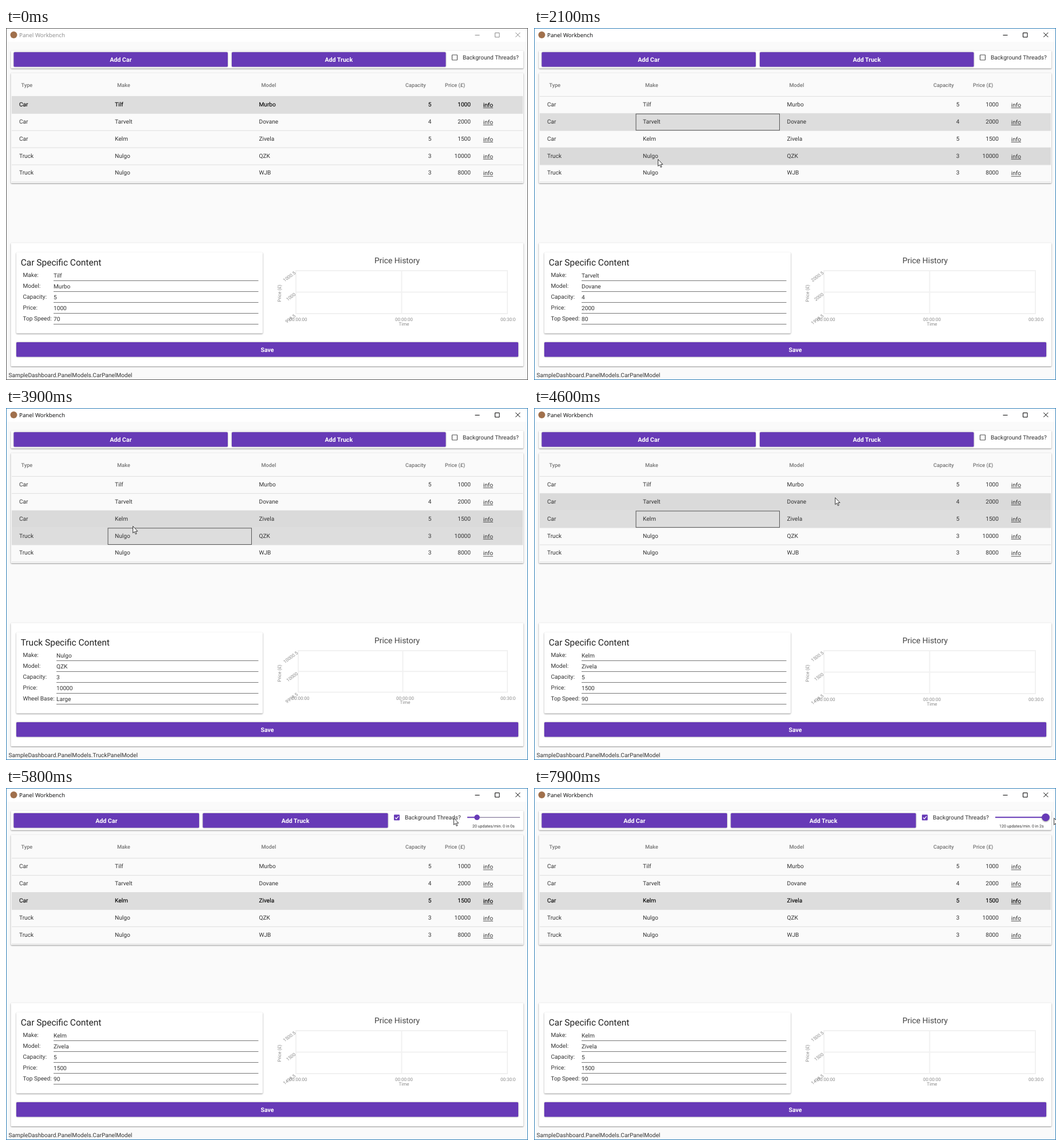
An HTML page that plays this animation: 911x615 px, repeating every 8 s.

```html
<!DOCTYPE html>
<html lang="en">
<head>
<meta charset="utf-8">
<title>Panel Workbench</title>
<style>
html, body { margin: 0; width: 100%; height: 100%; overflow: hidden; background: #fafafa; }
svg { display: block; width: 911px; height: 615px; font: 10.15px Roboto, sans-serif; text-rendering: geometricPrecision; }
text { fill: #333; white-space: pre; }
.card { filter: drop-shadow(0 1px 1.2px rgba(0, 0, 0, .42)); }
.button { fill: #673ab7; filter: drop-shadow(0 .8px 1px rgba(0, 0, 0, .4)); }
.caption { fill: #fff; font-weight: 700; font-size: 10.6px; }
.head { fill: #757575; font-weight: 500; font-size: 9.2px; }
.form-title { font-size: 15.5px; fill: #222; }
.chart { filter: blur(.4px); }
.chart text { font-size: 8px; fill: #8a8a8a; }
.chart path { fill: none; stroke: #f1f1f1; stroke-width: 2; }
</style>
</head>
<body>
<svg id="stage" viewBox="0 0 911 615"></svg>
<script>
const LOOP = 8000, STEP = 100;
const PURPLE = '#673ab7';
const CHECKED_AT = 5700, DRAG_AT = 6600;
const NUMBER_END = [742.5, 811];

const vehicles = [
  { type: 'Car', make: 'Tilf', model: 'Murbo', capacity: 5, price: 1000, extra: 70 },
  { type: 'Car', make: 'Tarvelt', model: 'Dovane', capacity: 4, price: 2000, extra: 80 },
  { type: 'Car', make: 'Kelm', model: 'Zivela', capacity: 5, price: 1500, extra: 90 },
  { type: 'Truck', make: 'Nulgo', model: 'QZK', capacity: 3, price: 10000, extra: 'Large' },
  { type: 'Truck', make: 'Nulgo', model: 'WJB', capacity: 3, price: 8000, extra: 'Small' }
];

// time of each selection and the chosen row
const picks = [[-1000, 0], [1500, 1], [2500, 3], [4000, 2]];

// time, x, y of the pointer tip
const pointer = [
  [100, 471, 8], [900, 222, 127], [1000, 220, 150], [1100, 219, 160],
  [1600, 219, 160], [2100, 216, 229], [3400, 216, 229], [3900, 221, 206],
  [4300, 221, 206], [4800, 728, 123], [5100, 768, 67], [5500, 781, 52],
  [5800, 781, 52], [6500, 822, 53], [7400, 876, 56], [7900, 907, 52]
];

const clamp = (v, lo, hi) => Math.min(hi, Math.max(lo, v));
const mix = (a, b, p) => a + (b - a) * p;
const text = (x, y, s, attrs = '') => `<text x="${x}" y="${y}" ${attrs}>${s}</text>`;
const rect = (x, y, w, h, attrs = '') => `<rect x="${x}" y="${y}" width="${w}" height="${h}" ${attrs}/>`;
const line = (x1, x2, y, color, w = 1) =>
  `<path d="M${x1} ${y}H${x2}" stroke="${color}" stroke-width="${w}"/>`;
const card = (x, y, w, h, fill = '#fff') => rect(x, y, w, h, `rx="1.5" class="card" fill="${fill}"`);
const middle = 'text-anchor="middle"';

function pointerAt(t) {
  if (t < pointer[0][0]) return { x: -50, y: -50 };
  const i = pointer.findIndex(k => k[0] > t);
  if (i < 0) { const [, x, y] = pointer.at(-1); return { x, y }; }
  const [a, b] = [pointer[i - 1], pointer[i]];
  const p = (t - a[0]) / (b[0] - a[0]);
  return { x: mix(a[1], b[1], p), y: mix(a[2], b[2], p) };
}

function button(x, y, w, label, tip) {
  const over = tip.x >= x && tip.x < x + w && tip.y >= y && tip.y < y + 25.5;
  return rect(x, y, w, 25.5, `rx="1.5" class="button" opacity="${over ? .9 : 1}"`) +
    text(x + w / 2, y + 16.7, label, `${middle} class="caption"`);
}

function titleBar(active) {
  const ink = active ? '#000' : '#888';
  return rect(0, 0, 911, 24, 'fill="#fff"') +
    '<circle cx="13.5" cy="12" r="6" fill="#a0704c"/>' +
    text(23, 16, 'Panel Workbench', `style="font:9.8px 'Open Sans',sans-serif;fill:${ink}"`) +
    `<path d="M818.5 12.5h8M853.5 8.5h7.5v7.5h-7.5zM889.3 8l8 8m0-8l-8 8" fill="none" stroke="${ink}"/>`;
}

function slider(t, tip) {
  const dragging = t >= DRAG_AT;
  const x = dragging ? clamp(tip.x, 822, 893) : 822;
  const rate = Math.round(20 + (x - 822) / .71);
  const seconds = Math.floor((t - CHECKED_AT) / 1000);
  return line(805, 897, 51.3, '#6b5a85') + line(805, x, 51.3, PURPLE, 2) +
    `<circle cx="${x}" cy="51.3" r="${dragging ? 6.8 : 4.8}" fill="${PURPLE}" ${dragging ? 'class="card"' : ''}/>` +
    text(850.8, 69, `${rate} updates/min. 0 in ${seconds}s`, `${middle} font-size="7"`);
}

function toolbar(t, tip, checked) {
  const box = checked
    ? rect(677, 46.5, 10, 10, `rx="1" fill="${PURPLE}"`) +
      '<path d="M679 51.6l2.2 2.2 4-4.4" fill="none" stroke="#fff" stroke-width="1.3"/>'
    : rect(778.5, 47, 9, 9, 'rx=".8" fill="#fff" stroke="#555" stroke-width="1.2"');
  const label = text(checked ? 696 : 797, 55.2, 'Background Threads?');
  const buttons = checked
    ? button(13.5, 44, 323.5, 'Add Car', tip) + button(343.5, 44, 323, 'Add Truck', tip)
    : button(13.5, 42.3, 373.5, 'Add Car', tip) + button(394, 42.3, 373.5, 'Add Truck', tip);
  return card(8.5, 39.5, 894.5, checked ? 34 : 31) + buttons + box + label + (checked ? slider(t, tip) : '');
}

function row(v, i, top, selected, focused, hover) {
  const y = top + i * 29.9, base = y + 17.4;
  const fill = selected ? '#ddd' : hover ? '#dadada' : 'none';
  const ink = selected && !focused ? 'style="fill:#000;stroke:#000;stroke-width:.12"' : '';
  return rect(10, y, 892, 29.9, `fill="${fill}"`) + line(10, 902, y + 29.9, '#dedede') +
    (selected && focused ? rect(178, y + .8, 250.5, 28.6, 'fill="none" stroke="#555"') : '') +
    text(23, base, v.type, ink) + text(190, base, v.make, ink) + text(441.5, base, v.model, ink) +
    [v.capacity, v.price].map((n, k) => text(NUMBER_END[k], base, n, `text-anchor="end" ${ink}`)).join('') +
    text(832.7, base + 1, 'info', ink) + line(832.7, 850, base + 2.8, '#333', .8);
}

function table(t, tip, checked, selected) {
  const shift = checked ? 3.3 : 0, top = 119.4 + shift;
  const focused = t >= 1500 && !checked;
  const hovered = tip.x > 10 && tip.x < 902 ? Math.floor((tip.y - top) / 29.9) : -1;
  const heads = [[26.5, 'Type'], [194, 'Make'], [445.5, 'Model'], [697, 'Capacity'], [766, 'Price (£)']];
  return card(8.5, 78.5 + shift, 894.5, 192.5, '#fafafa') +
    heads.map(([x, s]) => text(x, 102.7 + shift, s, 'class="head"')).join('') +
    line(10, 902, top, '#dedede') +
    vehicles.map((v, i) => row(v, i, top, i === selected, focused, i === hovered)).join('');
}

function form(v) {
  const truck = v.type === 'Truck', x = truck ? 88 : 83;
  const fields = [['Make:', v.make], ['Model:', v.model], ['Capacity:', v.capacity],
    ['Price:', v.price], [truck ? 'Wheel Base:' : 'Top Speed:', v.extra]];
  return card(18, 392, 430, 141.5) +
    text(25.7, 414.6, v.type + ' Specific Content', 'class="form-title"') +
    fields.map(([label, value], i) => {
      const y = 434.5 + i * 19;
      return text(29.5, y, label) + text(x, y + 1.5, value) + line(x, 440.5, y + 7, '#777');
    }).join('');
}

function priceLabels(v, left, bottom, alpha) {
  const levels = [v.price + .5, v.price, v.price - .5];
  return `<g opacity="${alpha}">` + levels.map((n, i) => {
    const y = mix(424, bottom, i / 2) + 5;
    return text(left, y, n, `text-anchor="end" transform="rotate(-37 ${left} ${y})"`);
  }).join('') + '</g>';
}

function chart(from, to, p) {
  const wide = v => v.type === 'Truck' ? 1 : 0;
  const k = mix(wide(from), wide(to), p);
  const left = 506 + 4 * k, bottom = 499 - 2.5 * k;
  const mx = (left + 875) / 2, my = (424 + bottom) / 2, base = bottom + 13;
  return text(682.5, 411, 'Price History', `${middle} style="font-size:13.9px;fill:#444;filter:blur(.25px)"`) +
    '<g class="chart">' +
    `<path d="M${left} 424H875V${bottom}H${left}zM${mx} 424V${bottom}M${left} ${my}H875"/>` +
    text(0, 0, 'Price (£)', `${middle} transform="translate(480 463.5) rotate(-90)"`) +
    text(left + 4, base, '00:00:00', middle) + text(mx + 4, base, '00:00:00', middle) +
    text(863, base, '00:30:0') + text(mx + 4, base + 7.5, 'Time', middle) +
    (p < 1 ? priceLabels(from, left, bottom, 1 - p) : '') + priceLabels(to, left, bottom, p) +
    '</g>';
}

function cursor({ x, y }) {
  return `<path transform="translate(${x} ${y})" d="M.5 .5V12.4L3.2 9.9L5.2 14.4L7 13.6L5.1 9.3H8.8Z"
    fill="#fff" stroke="#222" stroke-width=".9"/>`;
}

const stage = document.getElementById('stage');

function draw(t) {
  const tip = pointerAt(t), checked = t >= CHECKED_AT, active = t >= 1500;
  const n = picks.findLastIndex(pick => pick[0] <= t);
  const [since, selected] = picks[n];
  const current = vehicles[selected];
  const previous = vehicles[picks[Math.max(0, n - 1)][1]];
  const fade = clamp((t - since - 200) / 400, 0, 1);
  stage.innerHTML = rect(0, 0, 911, 615, 'fill="#fafafa"') + titleBar(active) +
    toolbar(t, tip, checked) + table(t, tip, checked, selected) +
    card(8.5, 375.5, 894.5, 215.5) + form(current) + chart(previous, current, fade) +
    button(18, 549, 876, 'Save', tip) +
    text(4.5, 610.3, `SampleDashboard.PanelModels.${current.type}PanelModel`) +
    rect(.5, .5, 910, 614, `fill="none" stroke="${active ? '#2f7fb8' : '#5a5a5a'}"`) +
    cursor(tip);
}

const start = performance.now();
let shown = -1;

function tick(now) {
  const t = Math.floor((Math.max(0, now - start) % LOOP) / STEP) * STEP;
  if (t !== shown) draw(shown = t);
  requestAnimationFrame(tick);
}
tick(start);
</script>
</body>
</html>
```
